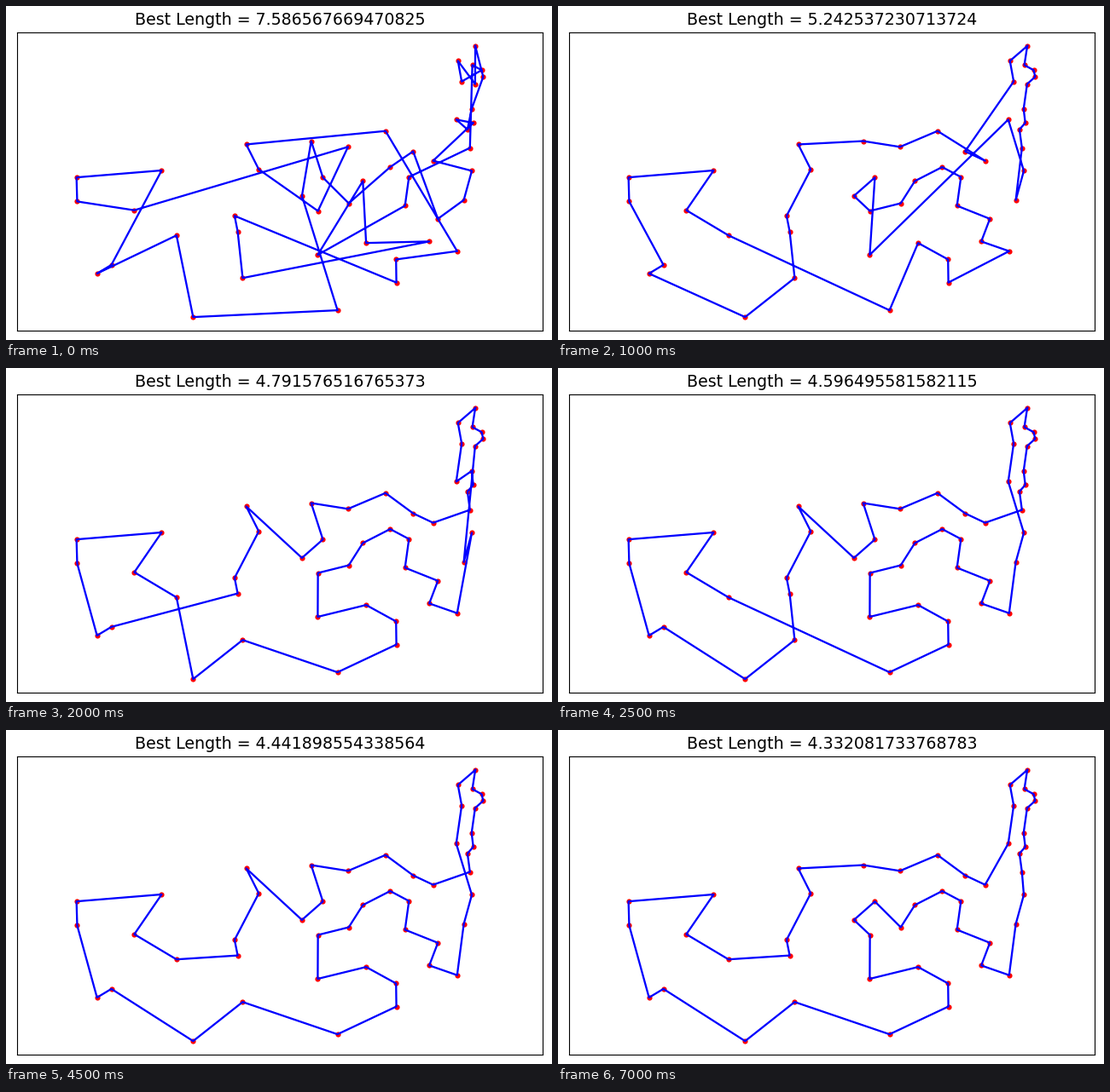
Recreate the animation shown at these times as a matplotlib script. Size 640 px wide and 392 px high, loop 7.5 s.

```python
import math

import matplotlib.pyplot as plt
from matplotlib.animation import FuncAnimation

W, H, DPI = 640, 392, 100
LEFT, RIGHT, TOP, BOTTOM = 13, 629, 31, 381
SCALE = 7762

# The att48 data set, listed along the last tour
CITIES = [
    (7611, 5184), (7555, 4819), (7732, 4723), (7762, 4595), (7608, 4458), (7541, 3981),
    (7573, 3716), (7462, 3590), (7509, 3239), (7545, 2801), (7392, 2244), (7265, 1268),
    (6734, 1453), (6898, 1885), (6271, 2135), (6347, 2683), (5989, 2873), (5468, 2606),
    (5199, 2182), (4706, 2674), (4307, 2322), (4612, 2035), (4608, 1198), (5530, 1424),
    (6101, 1110), (6107, 669), (4985, 140), (3177, 756), (2233, 10), (675, 1006),
    (401, 841), (23, 2216), (10, 2676), (1633, 2809), (1112, 2049), (1916, 1569),
    (3082, 1644), (3023, 1942), (3484, 2829), (3245, 3305), (4483, 3369), (5185, 3258),
    (5900, 3561), (6426, 3173), (6807, 2993), (7248, 3779), (7352, 4506), (7280, 4899),
]
POINTS = [(x / SCALE, y / SCALE) for x, y in CITIES]

# Best tour per step as runs of cities, with its length where already known
STEPS = [
    ("0 3 5 7 45 6 44 9 10 13 43 16 18 19 40 20 26 28 35 30 29 33-31 34 41 21 "
     "38 39 42 11 24 25 37 36 27 12 23 17 22 14 15 8 1 2 46 47 4", 7.586567669470825),
    ("0 3-1 4-8 10 9 45 22 19-21 17 18 16-11 24 25 23 26 35 34 31-33 29 30 28 27 "
     "36-42 44 43 46 47", None),
    ("0-8 10 9 45 22 19-21 18-11 25-23 26 35-31 29 30 28 27 36-42 44 43 46 47",
     5.242537230713724),
    ("0-7 45 8 10 9 11-18 21-26 35-31 29 30 28 27 36-39 20 19 40-42 44 43 46 47", None),
    ("0-4 10 9 11-18 21-28 35-29 36-39 20 19 40-44 8-5 45-47", 4.791576516765373),
    ("0-8 44-40 19 20 39-36 27-35 26-21 18-9 45-47", 4.596495581582115),
    ("0-8 44-40 19 20 39-21 18-9 45-47", 4.441898554338564),
    ("0-8 44-40 19 20 39-36 27-35 26-21 18-9 45-47", 4.596495581582115),
    ("0-8 44-40 19 20 39-36 27-35 22 26-23 21 18-9 45-47", None),
    ("0-8 44-40 19 20 39-21 18-9 45-47", 4.441898554338564),
    ("0-6 8-18 21-39 20 19 40-44 7 45-47", None),
    ("0-18 21-39 20 19 40-47", 4.387116767135597),
    ("0-18 20 19 21-47", None),
    ("0-8 44-9 45-47", None),
    ("0-47", 4.332081733768783),
]


def expand(runs):
    """Turn '0-2 9-7' into [0, 1, 2, 9, 8, 7]."""
    tour = []
    for run in runs.split():
        ends = [int(n) for n in run.split("-")]
        a, b = ends[0], ends[-1]
        step = 1 if b >= a else -1
        tour.extend(range(a, b + step, step))
    return tour


def closed_path(runs):
    tour = expand(runs)
    return [POINTS[i] for i in tour + tour[:1]]


def path_length(path):
    return sum(math.dist(p, q) for p, q in zip(path, path[1:]))


fig = plt.figure(figsize=(W / DPI, H / DPI), dpi=DPI, facecolor="white")
ax = fig.add_axes([LEFT / W, 1 - BOTTOM / H, (RIGHT - LEFT) / W, (BOTTOM - TOP) / H])
ax.set_xticks([])
ax.set_yticks([])

xs, ys = zip(*POINTS)
ax.scatter(xs, ys, s=20, color="red", linewidths=0, zorder=1)
route, = ax.plot([], [], color="blue", lw=1.65, zorder=2)
title = ax.set_title("", fontsize=13.7, pad=6.5, fontfamily="DejaVu Sans")

# Equal aspect with a 5% margin above and below
half_y = 0.55 * (max(ys) - min(ys))
half_x = half_y * (RIGHT - LEFT) / (BOTTOM - TOP)
mid_x, mid_y = (min(xs) + max(xs)) / 2, (min(ys) + max(ys)) / 2
ax.set_xlim(mid_x - half_x, mid_x + half_x)
ax.set_ylim(mid_y - half_y, mid_y + half_y)


def update(i):
    runs, length = STEPS[i]
    path = closed_path(runs)
    route.set_data(*zip(*path))
    title.set_text(f"Best Length = {length or path_length(path)}")
    return route, title


anim = FuncAnimation(fig, update, frames=len(STEPS), interval=500,
                     repeat=True, repeat_delay=0, blit=False)
plt.show()
```
